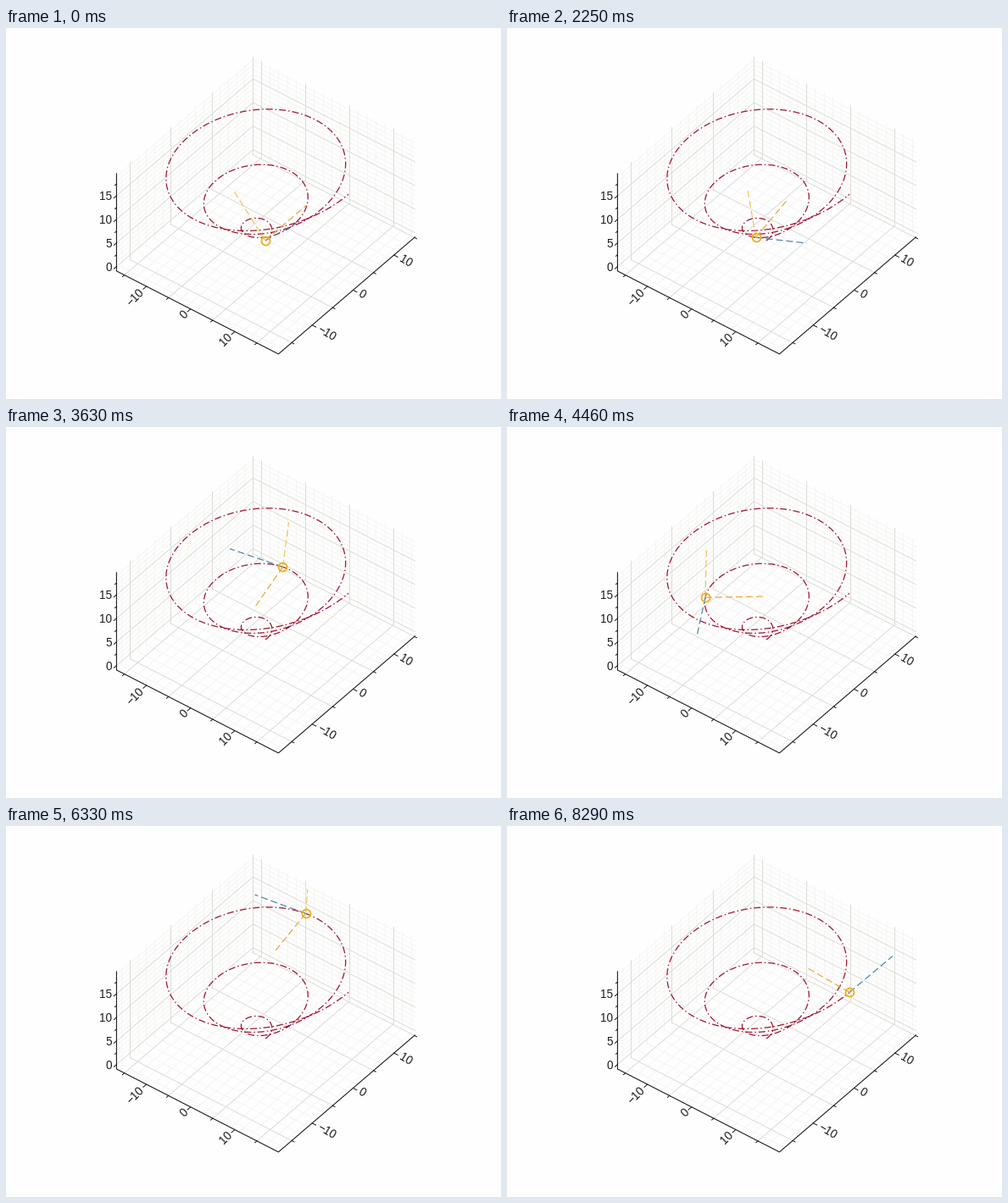
A matplotlib script for the animation above (8330 ms loop, 584 px wide and 438 px high).

```python
import numpy as np
import matplotlib.pyplot as plt
from matplotlib.animation import FuncAnimation

W, H, DPI = 584, 438, 100
FRAMES, LOOP_MS = 200, 8330
PX = 72 / DPI
T_END = 6 * np.pi
ARROW = 10

# axis limits of the box and the screen step (pixels) of one unit on each axis
LO = np.array([-16.776, -18.25, -0.95])
HI = np.array([19.887, 15.117, 19.7])
STEP = np.array([[5.21, 2.673], [4.825, -4.136], [0, -5.57]])
CORNER = np.array([130.4, 286.9])

BACK = "#fefefe"
GRID, FAINT, INK = "#dcdcd8", "#f5f5f3", "#1c1c1c"
RED, TEAL, ORANGE, YELLOW = "#a31a36", "#4c84a0", "#e8a63c", "#eec45a"

plt.rcParams["font.family"] = "Liberation Sans"
plt.rcParams["lines.scale_dashes"] = False
plt.rcParams["lines.dash_capstyle"] = "butt"

fig = plt.figure(figsize=(W / 100, H / 100), dpi=DPI, facecolor=BACK)
ax = fig.add_axes([0, 0, 1, 1])
ax.set_xlim(0, W)
ax.set_ylim(H, 0)
ax.axis("off")


def project(p):
    return CORNER + (np.asarray(p, float) - LO) @ STEP


def line(points, color, width=1.0, dash=None, z=1):
    xy = project(points)
    item, = ax.plot(xy[:, 0], xy[:, 1], color=color, lw=width * PX, zorder=z)
    if dash:
        item.set_dashes([d * PX for d in dash])
    return item


def grid_lines(axis, value, strong):
    """Draw one grid value on the two planes that contain it."""
    planes = {0: [(1, 2, LO[2]), (2, 1, HI[1])],
              1: [(0, 2, LO[2]), (2, 0, LO[0])],
              2: [(0, 1, HI[1]), (1, 0, LO[0])]}
    for run, fixed, at in planes[axis]:
        ends = np.zeros((2, 3))
        ends[:, axis] = value
        ends[:, fixed] = at
        ends[:, run] = LO[run], HI[run]
        line(ends, GRID if strong else FAINT, z=1 if strong else 0)


def draw_grid():
    for axis in (0, 1):
        for v in range(-17, 20, 2):
            if LO[axis] < v < HI[axis]:
                grid_lines(axis, v, v % 10 == 5)
    for v in range(20):
        grid_lines(2, v, v % 5 == 0)


def tick(at, way, size):
    x, y = project(at)
    ax.plot([x, x + way[0] * size], [y, y + way[1] * size],
            color=INK, lw=PX, zorder=2)
    return x, y


def label(x, y, value, ha, angle=0):
    ax.text(x, y, f"{value}".replace("-", "\u2212"), color=INK,
            fontsize=13.5 * PX, ha=ha, va="center", rotation=angle,
            rotation_mode="anchor", zorder=2)


def draw_axes():
    left = (LO[0], LO[1], LO[2])
    front = (HI[0], LO[1], LO[2])
    right = (HI[0], HI[1], LO[2])
    top = (LO[0], LO[1], HI[2])
    line([top, left, front, right], INK, 1.1, z=2)

    back_y = -STEP[1] / np.hypot(*STEP[1])
    along_x = STEP[0] / np.hypot(*STEP[0])
    for v in range(-15, 20, 5):
        major = v % 10 == 0
        size = 5 if major else 3
        x, y = tick((v, LO[1], LO[2]), back_y, size)
        u, w = tick((HI[0], v, LO[2]), along_x, size)
        if major:
            label(x + 7 * back_y[0], y + 7 * back_y[1], v, "right", 45)
            label(u + 8 * along_x[0], w + 8 * along_x[1], v, "left", -31)
    for i in range(8):
        major = i % 2 == 0
        x, y = tick((LO[0], LO[1], 2.5 * i), back_y, 4 if major else 2.5)
        if major:
            label(x - 5, y + 1, i // 2 * 5, "right")


def spiral(t):
    return np.array([t * np.cos(t), t * np.sin(t), t])


def frenet(t):
    c, s = np.cos(t), np.sin(t)
    tangent = np.array([c - t * s, s + t * c, 1])
    tangent /= np.linalg.norm(tangent)
    normal = np.array([-2 * s - t * c, 2 * c - t * s, 0])
    normal -= normal @ tangent * tangent
    normal /= np.linalg.norm(normal)
    return tangent, normal, np.cross(tangent, normal)


def clipped_end(p, d):
    """End of the vector d from p, cut where it leaves the box."""
    k = 1.0
    for i in range(3):
        if abs(d[i]) > 1e-9:
            wall = HI[i] if d[i] > 0 else LO[i]
            k = min(k, max(0, (wall - p[i]) / d[i]))
    return p + k * d


draw_grid()
draw_axes()
line(spiral(np.linspace(0, T_END, 900)).T, RED, 1.3, (8, 3, 1.5, 3), 3)

arrows = [line(np.zeros((2, 3)), color, 1.2, (8, 4), 4)
          for color in (TEAL, ORANGE, YELLOW)]
dot, = ax.plot([], [], "o", ms=10 * PX, mfc="none", mec="#ecb01c",
               mew=1.8 * PX, zorder=5)


def update(i):
    t = T_END * i / (FRAMES - 1)
    p = spiral(t)
    for arrow, d in zip(arrows, frenet(t)):
        xy = project([p, clipped_end(p, ARROW * d)])
        arrow.set_data(xy[:, 0], xy[:, 1])
    x, y = project(p)
    dot.set_data([x], [y])
    return [*arrows, dot]


anim = FuncAnimation(fig, update, frames=FRAMES, interval=LOOP_MS / FRAMES,
                     repeat=True, repeat_delay=0, blit=False)
plt.show()
```
